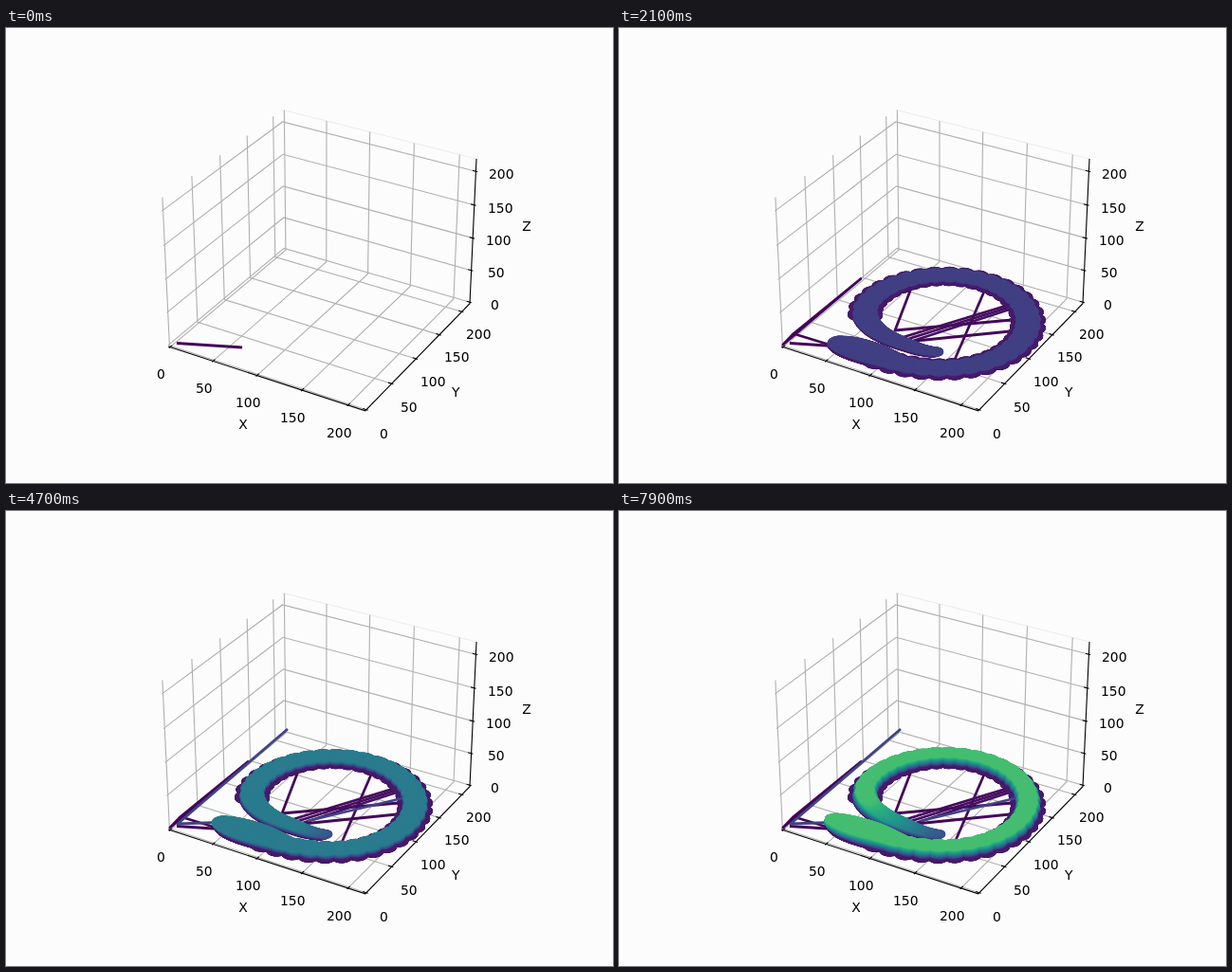
An HTML page with a canvas that plays this animation: 640 px wide and 480 px high, repeating every 8000 ms.

```html
<!DOCTYPE html>
<html lang="en">
<head>
<meta charset="utf-8">
<title>Layered build in 3D axes</title>
<style>
  html, body { margin: 0; width: 100%; height: 100%; overflow: hidden; background: #fcfcfc; }
  svg, canvas { position: absolute; left: 0; top: 0; width: 640px; height: 480px; }
  text { font: 13.89px "DejaVu Sans", sans-serif; fill: #000; }
</style>
</head>
<body>
<svg id="axes" viewBox="0 0 640 480"></svg>
<canvas id="plot" width="640" height="480"></canvas>
<script>
const LOOP = 8000, STEP = 100, LAYERS = 114, LAYER_HEIGHT = 0.15;
const BASE_LAYERS = 8, HALF_WIDTH = 11.5;
const LO = -2.1, HI = 218.3, MID = (LO + HI) / 2;
const K = 1.1905 / (HI - LO), KZ = 0.8929 / (HI - LO);
const RAD = Math.PI / 180;
const clamp = v => Math.max(0, Math.min(1, v));
const smooth = v => v * v * (3 - 2 * v);

// Perspective view: a runs right, b runs away, h runs up.
function view(a, b, h) {
  const s = 1997.8 / (10 + 0.866 * b - 0.5 * h);
  return [333 + a * s, 237.4 - (0.5 * b + 0.866 * h) * s];
}
function project(x, y, z) {
  const X = (x - MID) * K, Y = (y - MID) * K;
  return view(0.866 * X + 0.5 * Y, -0.5 * X + 0.866 * Y, (z - MID) * KZ);
}

// ---- axes ----
const svg = document.getElementById('axes');
function add(tag, attrs, text) {
  const el = document.createElementNS('http://www.w3.org/2000/svg', tag);
  for (const name in attrs) el.setAttribute(name, attrs[name]);
  if (text !== undefined) el.textContent = text;
  svg.append(el);
}
function path3d(color, ...points) {
  const list = points.map(p => project(...p).map(v => v.toFixed(2)).join()).join(' ');
  add('polyline', { points: list, fill: 'none', stroke: color, 'stroke-width': 1.11 });
}
function tickLabel(value, point) {
  const [x, top] = project(...point);
  const width = 8.84 * String(value).length;
  add('text', { x: Math.round(x - width / 2 + 0.9), y: Math.round(top + 11.2) }, value);
}
function axisLabel(name, point) {
  const [x, y] = project(...point);
  add('text', { x: x + 0.5, y: Math.round(y + 5), 'text-anchor': 'middle' }, name);
}
function drawAxes() {
  const ticks = Array.from({ length: 5 }, (_, i) => i * 50);
  path3d('#ececec', [LO, HI, HI], [HI, HI, HI]);
  for (const t of ticks) {
    path3d('#b0b0b0', [t, LO, LO], [t, HI, LO], [t, HI, HI]);
    path3d('#b0b0b0', [HI, t, LO], [LO, t, LO], [LO, t, HI]);
    path3d('#b0b0b0', [LO, LO, t], [LO, HI, t], [HI, HI, t]);
  }
  path3d('#000', [LO, LO, LO], [HI, LO, LO], [HI, HI, LO], [HI, HI, HI]);

  const inward = 3.67, outward = 1.84, gap = 18.3, far = 39.8;
  for (const t of ticks) {
    path3d('#000', [t, LO + inward, LO], [t, LO - outward, LO]);
    path3d('#000', [HI - inward, t, LO], [HI + outward, t, LO]);
    path3d('#000', [HI - inward, HI, t], [HI + outward, HI, t]);
    tickLabel(t, [t, LO - gap, LO - gap]);
    tickLabel(t, [HI + gap, t, LO - gap]);
    tickLabel(t, [HI + gap, HI + gap, t]);
  }
  axisLabel('X', [MID, LO - far, LO - far]);
  axisLabel('Y', [HI + far, MID, LO - far]);
  axisLabel('Z', [HI + far, HI + far, MID]);
}

// ---- printed body ----
const ctx = document.getElementById('plot').getContext('2d');
const VIRIDIS = ['440154', '472d7b', '3b528b', '2c728e', '21918c', '28ae80', '5ec962']
  .map(hex => [0, 2, 4].map(i => parseInt(hex.slice(i, i + 2), 16)));

function layerColor(n) {
  const p = n / LAYERS * 8, i = Math.floor(p);
  return `rgb(${VIRIDIS[i].map((v, j) => Math.round(v + (VIRIDIS[i + 1][j] - v) * (p - i)))})`;
}

// Radius of the coil's centre line: flares out at its start, curls in at its end.
function coil(deg) {
  const flare = 29 * Math.exp((202 - deg) / 22);
  const curl = 27 * smooth(clamp((deg - 515) / 85));
  return 85.2 - 1.8 * Math.cos(2 * deg * RAD) + flare - curl;
}

function bead(deg, radius, across, along, z) {
  const c = Math.cos(deg * RAD), s = Math.sin(deg * RAD), h = (z - MID) * KZ;
  ctx.beginPath();
  for (let i = 0; i < 24; i++) {
    const f = i * Math.PI / 12;
    const r = radius + across * Math.cos(f), t = along * Math.sin(f);
    ctx.lineTo(...view(0.053 + K * (r * c - t * s), 0.023 + K * (r * s + t * c), h));
  }
  ctx.closePath();
  ctx.fill();
  ctx.stroke();
}

function drawBody(n) {
  const z = n * LAYER_HEIGHT, base = n <= BASE_LAYERS;
  const half = base ? HALF_WIDTH : HALF_WIDTH * Math.sqrt(1 - (n / 110) ** 2);

  for (let a = 228; a < 540; a += 9.5) bead(a, coil(a), base ? 16.5 : half, 12, z);

  // tapered inner end, which stops growing earlier towards its tip
  const end = 619 + 6 * clamp(n / 26);
  const top = Math.min(end, 630 - (n - 25) / 0.62);
  for (let a = 538; a <= top; a += 2) {
    const r = half * (1 - 0.55 * (a - 538) / 92);
    bead(a, coil(a), r, r, z);
  }

  // broad outer end, which leans out as it rises
  const grow = clamp(n / 50);
  const scale = (half / HALF_WIDTH + 1) / 2;
  for (let p = 0; p <= 1; p += 0.05) {
    const tip = grow * (1 - p) ** 4;
    const r = (4 + 6.5 * p + 10 * Math.sin(Math.PI * Math.sqrt(p))) * scale + (base ? 2 : 0);
    const a = 202 + 40 * p;
    bead(a - 3 * tip, coil(a) + 6 * tip - 3 * Math.sin(Math.PI * p), r, r, z);
  }
}

// ---- travel moves, in screen points ----
function travel(...points) {
  ctx.beginPath();
  for (const p of points) ctx.lineTo(...p);
  ctx.stroke();
}
function drawTravel(n) {
  if (n === 0) travel([180, 332.5], [249, 337]);
  if (n === 1) travel([228, 336], [184, 322.5], [255, 264.5], [173, 334], [184, 322.5]);
  if (n === 2) {
    travel([309, 272], [291, 319], [414, 308]);
    travel([385, 278], [353, 352]);
    travel([313, 330], [412, 320]);
  }
  if (n > 2 && n < 6) travel([285 + 5 * n, 320 + 2 * n], [413, 284 + 2.5 * n]);
  if (n === 23) {
    travel([297, 230], [181, 330], [225, 328.5]);
    travel([318, 327], [422, 302]);
  }
}

function drawLayer(n) {
  ctx.strokeStyle = ctx.fillStyle = layerColor(n);
  ctx.lineWidth = 2.78;
  ctx.lineJoin = 'round';
  drawTravel(n);
  if (n > 0) drawBody(n);
}

let drawn = -1;
function show(time) {
  const n = Math.floor((time % LOOP) / STEP);
  if (n < drawn) {
    ctx.clearRect(0, 0, 640, 480);
    drawn = -1;
  }
  while (drawn < n) drawLayer(++drawn);
}

drawAxes();
const start = performance.now();
function tick() {
  show(performance.now() - start);
  requestAnimationFrame(tick);
}
tick();
</script>
</body>
</html>
```
